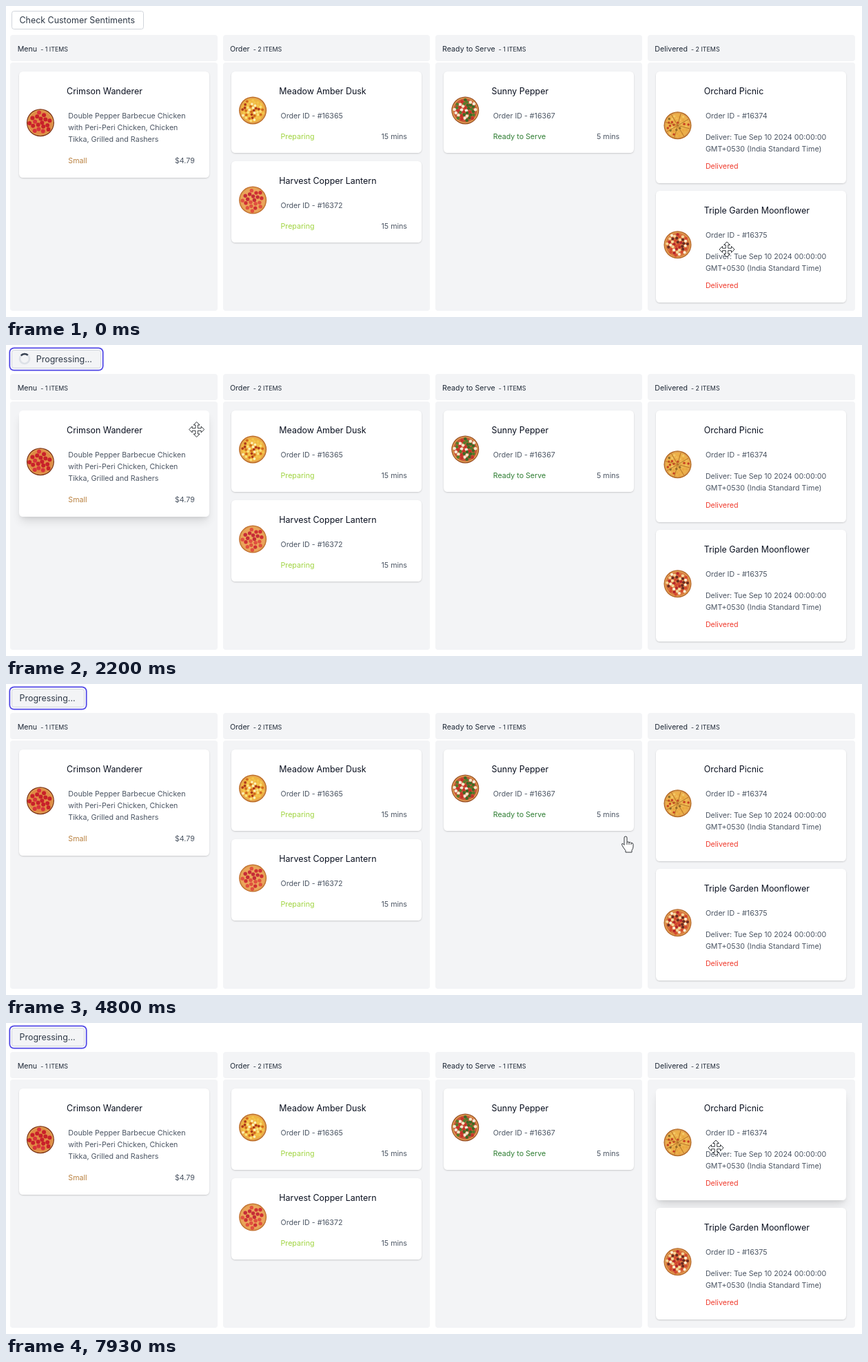
Write an HTML page that moves like this. It is 1242 px wide and 451 px high and loops after 8 s.

```html
<!DOCTYPE html>
<html lang="en">
<head>
<meta charset="utf-8">
<title>Order board</title>
<style>
  html, body { margin: 0; width: 100%; height: 100%; overflow: hidden; background: #fff; }
  #stage { position: relative; width: 1242px; height: 451px; overflow: hidden; }
  #stage div { position: absolute; box-sizing: border-box; }
  .panel { background: #f3f4f6; border-radius: 4px; }
  .card {
    background: #fff; border-radius: 5.4px;
    box-shadow: 0 .9px 2.7px rgba(0,0,0,.1), 0 .9px 1.8px rgba(0,0,0,.08);
  }
  .card.hover {
    box-shadow: 0 9px 13.5px -2.7px rgba(0,0,0,.12), 0 3.6px 5.4px -1.8px rgba(0,0,0,.07);
  }
  #button { border: 1px solid #d1d5db; border-radius: 3.6px; background: #fff; }
  svg { position: absolute; left: 0; top: 0; }
  text { font: 10.67px Inter, sans-serif; fill: #4b5563; white-space: pre; }
  text.title { font-size: 12.44px; fill: #0b1120; }
  text.head { fill: #1f2937; }
  .head tspan { font-size: 8.9px; }
  #label { font-size: 12.44px; fill: #2f3947; }
  .cursor { stroke: #1f2328; stroke-width: .9; stroke-linejoin: round; fill: #fff; }
</style>
</head>
<body>
<div id="stage"></div>
<script>
const LOOP = 8000, TICKS = 120, TICK = LOOP / TICKS;
const COL_X = 6.4, COL_STEP = 308.2, COL_W = 300.7;
const stage = document.getElementById('stage');

const LIME = '#a0d440', GREEN = '#2e7d32', RED = '#ef3b2d', TAN = '#b9803f';
const DELIVERY = ['Deliver: Tue Sep 10 2024 00:00:00', 'GMT+0530 (India Standard Time)'];

const PIZZAS = {
  pepperoni: { crust: '#7d2f14', base: '#e08a45', tops: ['#c8202a', '#d8323a'], n: 18, size: 3 },
  corn: { crust: '#b9651d', base: '#f0b440', tops: ['#f9e27c', '#b03a1b', '#fbeeb4', '#d2691e', '#f3c64c'], n: 44, size: 1.9 },
  salami: { crust: '#c06a2c', base: '#eba45a', tops: ['#cf3034', '#e0503f', '#c62c37'], n: 20, size: 2.7 },
  garden: { crust: '#96481f', base: '#c9583a', tops: ['#f3e7d3', '#557c2a', '#c5322a', '#f5e6c4', '#3f6a24'], n: 40, size: 2.3 },
  sliced: { crust: '#b0651f', base: '#ecb04a', tops: ['#f3c868', '#c63f22', '#e8a63f', '#f0bd58', '#8a6a28'], n: 36, size: 1.7, slices: 4 },
  mixed: { crust: '#b5642a', base: '#d9753f', tops: ['#f9ecd0', '#b5262a', '#f4d79a', '#6b2c22', '#d4482f'], n: 42, size: 2.1 }
};

const order = (name, id, pizza, y, state, color, time) => ({
  name, pizza, y, h: 118.9, lines: [[`Order ID - #${id}`, 68.5]], foot: [state, color, 98, time]
});
const delivered = (name, id, pizza, y) => ({
  name, pizza, y, h: 162.5, foot: ['Delivered', RED, 141],
  lines: [[`Order ID - #${id}`, 68.5], [DELIVERY[0], 99], [DELIVERY[1], 116]]
});

const COLUMNS = [
  ['Menu', [{
    name: 'Crimson Wanderer', pizza: 'pepperoni', y: 94.5, h: 154.5, foot: ['Small', TAN, 133, '$4.79'],
    lines: [['Double Pepper Barbecue Chicken', 68.5], ['with Peri-Peri Chicken, Chicken', 85.5], ['Tikka, Grilled and Rashers', 102.5]]
  }]],
  ['Order', [
    order('Meadow Amber Dusk', 16365, 'corn', 94.5, 'Preparing', LIME, '15 mins'),
    order('Harvest Copper Lantern', 16372, 'salami', 224.6, 'Preparing', LIME, '15 mins')
  ]],
  ['Ready to Serve', [order('Sunny Pepper', 16367, 'garden', 94.5, 'Ready to Serve', GREEN, '5 mins')]],
  ['Delivered', [
    delivered('Orchard Picnic', 16374, 'sliced', 94.5),
    delivered('Triple Garden Moonflower', 16375, 'mixed', 267.5)
  ]]
];

function box(x, y, w, h, cls = '', id = '') {
  const el = document.createElement('div');
  el.className = cls;
  el.id = id;
  el.style.cssText = `left:${x}px;top:${y}px;width:${w}px;height:${h}px`;
  stage.append(el);
  return el;
}

const text = (x, y, str, attrs = '') => `<text x="${x}" y="${y}" ${attrs}>${str}</text>`;
const disc = (x, y, r, fill) => `<circle cx="${x.toFixed(2)}" cy="${y.toFixed(2)}" r="${r}" fill="${fill}"/>`;

let seed = 11;
const random = () => (seed = seed * 16807 % 2147483647) / 2147483647;

// Toppings follow a sunflower spiral with seeded colours.
function pizza(cx, cy, { crust, base, tops, n, size, slices = 0 }) {
  let out = disc(0, 0, 20, crust) + disc(0, 0, 18.8, '#dfa052') + disc(0, 0, 17.2, base);
  for (let i = 0; i < n; i++) {
    const r = 16 * Math.sqrt((i + .4) / n), a = i * 2.39996;
    out += disc(r * Math.cos(a), r * Math.sin(a), size, tops[Math.floor(random() * tops.length)]);
  }
  for (let i = 0; i < slices; i++)
    out += `<path d="M-18 0H18" stroke="#b06c24" stroke-width=".8" transform="rotate(${i * 45 + 15})"/>`;
  return `<g transform="translate(${cx} ${cy})">${out}</g>`;
}

const cards = [];
let art = '';
COLUMNS.forEach(([label, items], i) => {
  const x = COL_X + COL_STEP * i;
  box(x, 42, COL_W, 38, 'panel');
  box(x, 82, COL_W, 360, 'panel');
  art += text(x + 10.3, 65.5, `${label}<tspan dx="5">- ${items.length} ITEMS</tspan>`, 'class="head"');
  for (const { name, pizza: kind, y, h, lines, foot: [state, color, dy, right] } of items) {
    const left = x + 12.2, w = COL_W - 24.4;
    cards.push({ left, y, w, h, el: box(left, y, w, h, 'card') });
    art += pizza(x + 43.5, y + h / 2 - 2.5, PIZZAS[kind]);
    art += text(x + 81.7, y + 33, name, 'class="title"');
    for (const [line, ly] of lines) art += text(x + 83.9, y + ly, line);
    art += text(x + 83.9, y + dy, state, `style="fill:${color}"`);
    if (right) art += text(x + 267.4, y + dy, right, 'text-anchor="end"');
  }
});

const button = box(8, 7, 192, 27, '', 'button');

stage.insertAdjacentHTML('beforeend', `<svg width="1242" height="451">
  ${art}
  <text id="label" y="24.6"></text>
  <g id="spinner" fill="none" stroke-width="2.6">
    <circle r="7" stroke="#dde1e7"/>
    <path d="M4.95-4.95A7 7 0 0 1 4.95 4.95" stroke="#374151"/>
  </g>
  <path id="move" class="cursor" d="M0-11L4.5-6.5H1.7V-1.7H6.5V-4.5L11 0 6.5 4.5V1.7H1.7V6.5H4.5L0 11-4.5 6.5H-1.7V1.7H-6.5V4.5L-11 0-6.5-4.5V-1.7H-1.7V-6.5H-4.5Z"/>
  <g id="hand" class="cursor">
    <path d="M-2 2A2 2 0 0 1 2 2V8.5Q3.5 7 5 8.7 7 7.5 8 9.6 10.6 8.8 11 11.5V15Q11 18 9 20V23H0V20.5Q-3 17-5.3 12.5-6 10-3.8 10.5L-2 12.5Z"/>
    <path d="M2 8.5V12M5 8.7V12M8 9.6V12" fill="none"/>
  </g>
</svg>`);
const [label, spinner, move, hand] = ['label', 'spinner', 'move', 'hand'].map(id => document.getElementById(id));

// Pointer path: tick, x, y
const PATH = [
  [0, 1046, 353], [2, 1046, 353], [6, 700, 200], [10, 180, 34], [12, 125, 22], [14, 122, 22],
  [17, 120, 30], [21, 117, 51], [26, 150, 64], [32, 250, 110], [38, 410, 185], [44, 484, 205],
  [47, 520, 265], [50, 580, 283], [52, 770, 280], [53, 833, 277], [57, 1036, 340], [65, 1046, 352],
  [68, 1010, 330], [72, 899, 221], [75, 940, 300], [78, 1050, 353], [91, 1052, 353],
  [93, 1040, 350], [96, 640, 290], [99, 418.5, 252.5], [105, 420, 256], [109, 700, 230],
  [113, 1020, 190], [117, 1030, 181], [120, 1030, 181]
];

function pointerAt(tick) {
  const i = PATH.findIndex(p => p[0] > tick);
  const [t0, x0, y0] = PATH[i - 1], [t1, x1, y1] = PATH[i];
  const k = (tick - t0) / (t1 - t0);
  return [x0 + (x1 - x0) * k, y0 + (y1 - y0) * k];
}

const cardAt = ([px, py]) =>
  cards.find(c => px >= c.left && px <= c.left + c.w && py >= c.y && py <= c.y + c.h);
const show = (el, on) => { el.style.display = on ? '' : 'none'; };
const place = (el, x, y, turn = 0) => el.setAttribute('transform', `translate(${x} ${y}) rotate(${turn})`);

const CLICK = 13, BUSY = 14, SPIN_END = 50;

function drawButton(tick, [px, py]) {
  const busy = tick >= BUSY, spinning = busy && tick < SPIN_END;
  const width = !busy ? 192 : spinning ? 130 : 106;
  const over = px > 8 && px < 200 && py > 7 && py < 34;
  const glow = busy ? 1 : tick === CLICK ? .4 : 0;
  button.style.width = width + 'px';
  button.style.background = busy ? '#f3f4f6' : over ? '#f9fafb' : '#fff';
  button.style.boxShadow = `0 0 0 1.78px #fff, 0 0 0 3.56px rgba(79,70,229,${glow})`;
  label.textContent = busy ? 'Progressing...' : 'Check Customer Sentiments';
  label.setAttribute('x', spinning ? 43.8 : 19.5);
  show(spinner, spinning);
  place(spinner, 27, 20, 48 + (tick - 21) * 420 / 23);
}

function draw(tick) {
  const pos = pointerAt(tick), onCard = cardAt(pos);
  // The card shadow trails the pointer by one tick.
  const lifted = tick > 0 && cardAt(pointerAt(tick - 1));
  for (const c of cards) c.el.classList.toggle('hover', c === lifted);
  show(move, onCard);
  show(hand, !onCard);
  place(onCard ? move : hand, ...pos);
  drawButton(tick, pos);
}

const start = performance.now();
function frame() {
  const t = (performance.now() - start) % LOOP;
  draw(Math.floor((t + 6) / TICK) % TICKS);
  requestAnimationFrame(frame);
}
frame();
</script>
</body>
</html>
```
